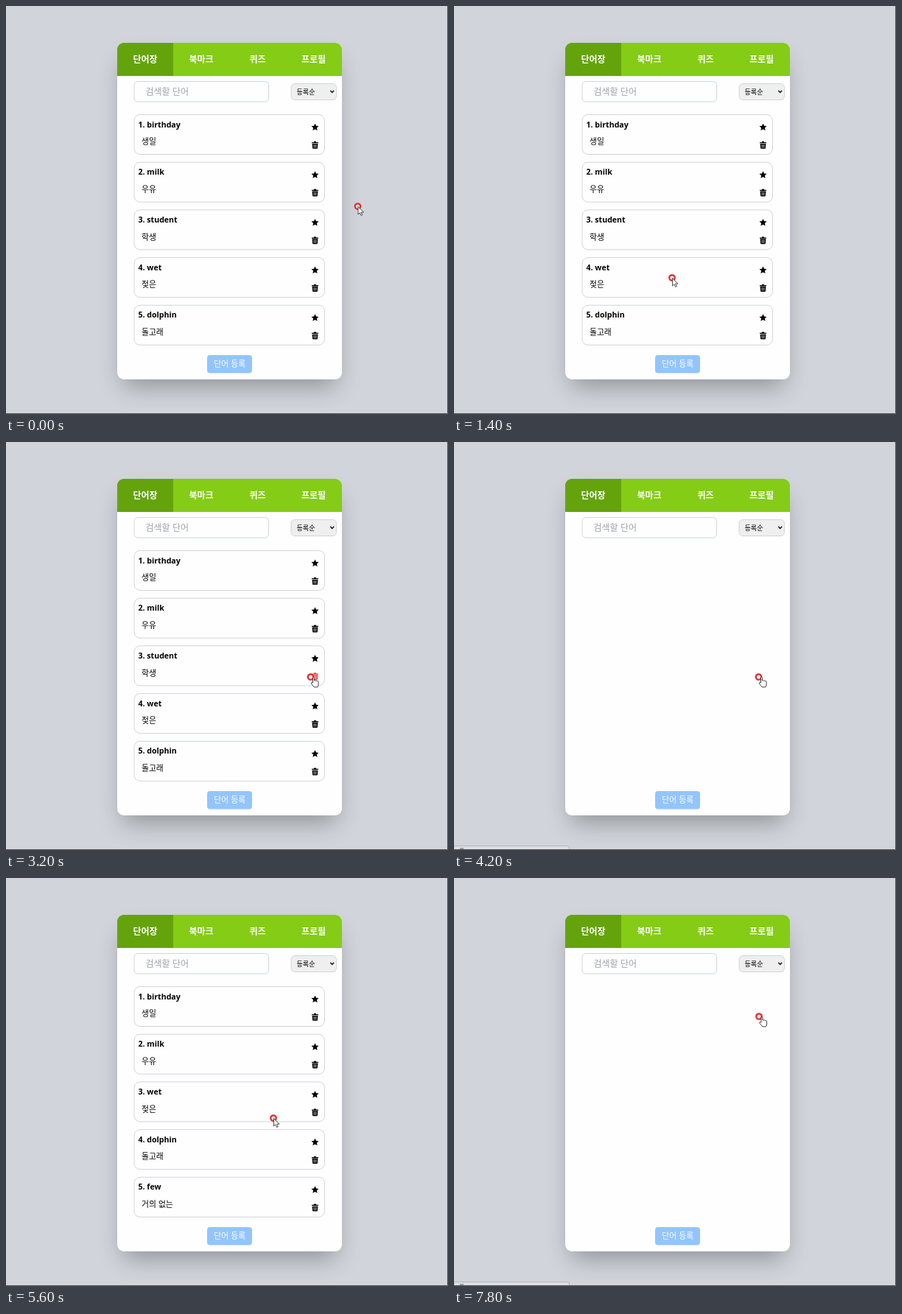
An HTML page for the animation above (8 s loop, 600x554 px).

```html
<!DOCTYPE html>
<html lang="ko">
<head>
<meta charset="utf-8">
<style>
  html, body { margin: 0; width: 100%; height: 100%; overflow: hidden; background: #d1d5db; }
  #stage { position: relative; width: 600px; height: 554px; overflow: hidden; }
  #card { position: absolute; left: 151px; top: 50px; width: 305px; height: 457px; border-radius: 9px;
    background: #fefefe; box-shadow: 0 17px 33px -8px rgba(0, 0, 0, .32); }
  svg { position: absolute; left: 0; top: 0; font: 10.8px 'Noto Sans CJK KR', 'Noto Sans CJK', sans-serif; }
  .tab { font-size: 12px; font-weight: 700; fill: #fff; text-anchor: middle; }
  .word { font: 700 10.6px 'Open Sans', 'Noto Sans', sans-serif; }
  .line { fill: none; stroke: #d1d5db; }
</style>
</head>
<body>
<div id="stage">
  <div id="card"></div>
  <svg width="600" height="554" viewBox="0 0 600 554">
    <defs>
      <clipPath id="view"><rect x="151" y="137" width="305" height="329"/></clipPath>
      <path id="star" d="M0-5 1.5-1.8 5-1.4 2.4 1 3.1 4.5 0 2.8-3.1 4.5-2.4 1-5-1.4-1.5-1.8Z"/>
      <g id="trash">
        <path d="M-4.5-3.8h2.6l.7-1.2h2.4l.7 1.2h2.6v1.3h-9ZM-3.9-1.9h7.8l-.5 6q-.1.9-1 .9h-4.8q-.9 0-1-.9Z"/>
        <path d="M-1.7-.7v4.4M0-.7v4.4M1.7-.7v4.4" stroke="#fff" stroke-width=".6"/>
      </g>
    </defs>
    <path d="M151 95V59a9 9 0 0 1 9-9H447a9 9 0 0 1 9 9V95Z" fill="#84cc16"/>
    <path d="M151 95V59a9 9 0 0 1 9-9H227V95Z" fill="#65a30d"/>
    <g class="tab">
      <text x="189" y="76.5">단어장</text>
      <text x="265" y="76.5">북마크</text>
      <text x="341.5" y="76.5">퀴즈</text>
      <text x="417.5" y="76.5">프로필</text>
    </g>
    <rect class="line" x="174" y="102.5" width="182.5" height="27.5" rx="5"/>
    <text x="189.5" y="121" font-size="12" fill="#9ca3af">검색할 단어</text>
    <rect x="387" y="105.5" width="61.5" height="22" rx="5" fill="#efefef" stroke="#d1d5db"/>
    <text x="394.5" y="119.7" font-size="9.1">등록순</text>
    <path d="M440.3 114.8l2.4 2.6 2.4-2.6" fill="none" stroke="#111" stroke-width="1.5"/>
    <g clip-path="url(#view)"><g id="list"></g></g>
    <rect x="273" y="474" width="61" height="24.5" rx="4" fill="#93c5fd"/>
    <text x="303.7" y="490.3" fill="#fff" text-anchor="middle">단어 등록</text>
    <g id="status">
      <path d="M0 548.5H154q2.5 0 2.5 2.5V554H0Z" fill="#dcdfe3" stroke="#b4b8be"/>
      <path d="M8 552h5" stroke="#555"/>
    </g>
    <path d="M599.5 0V553.5H0" fill="none" stroke="#4b4d50"/>
    <g id="pointer">
      <circle r="5.2" fill="#f3a5a5" opacity=".45"/>
      <circle id="ring" r="3.7" fill="#fff" fill-opacity=".6" stroke="#e03030" stroke-width="2.3"/>
      <path id="arrow" d="M.5.5V11l2.4-2.2 1.7 3.7 1.7-.8-1.7-3.6H8Z" fill="#fff" stroke="#222" stroke-width=".8"/>
      <path id="beam" d="M4 0.5q2 0 2 1.2 0-1.2 2-1.2M6 1.5v8M4 10.5q2 0 2-1.2 0 1.2 2 1.2" fill="none" stroke="#222" stroke-width=".9"/>
      <path id="hand" d="M3 8V1.2q1-1.4 2 0V5q1-.8 1.9.2 1-.6 1.8.4 1.8-.4 1.9 1.2V10q0 2-1.2 3.8H4.6Q3.4 11.8.9 9.2.2 7.7 1.6 7.5Z" fill="#fff" stroke="#222" stroke-width=".85"/>
    </g>
  </svg>
</div>
<script>
const LOOP = 8000, STEP = 100, PITCH = 64.7;
const $ = id => document.getElementById(id);
const words = [['birthday', '생일'], ['milk', '우유'], ['student', '학생'],
  ['wet', '젖은'], ['dolphin', '돌고래'], ['few', '거의 없는']];
const shorter = words.filter(w => w[0] !== 'student');

// Keys are [time, value, value...]
const cursorPath = [[0, 477.5, 272], [100, 470, 274], [500, 290, 305], [800, 279, 306], [1000, 280, 310],
  [1400, 296, 369], [1800, 300, 366], [2700, 413.5, 319], [4500, 413.5, 319], [4900, 191, 373],
  [5200, 210, 368], [5600, 363, 326], [6300, 414, 188]];
const scrollPath = [[0, 0], [400, 0], [700, 69], [1100, 69], [1400, 0],
  [5000, 0], [5200, 4.5], [5300, 4.5], [5500, 0]];

function at(keys, t) {
  const i = keys.findIndex(k => k[0] > t);
  if (i < 0) return keys[keys.length - 1].slice(1);
  const a = keys[i - 1], b = keys[i], p = (t - a[0]) / (b[0] - a[0]);
  const e = p * p * (3 - 2 * p);
  return a.slice(1).map((v, n) => v + (b[n + 1] - v) * e);
}

const within = (t, a, b) => t >= a && t < b;

function item([word, meaning], i, hot) {
  return `<g transform="translate(0 ${i * PITCH})">
    <rect class="line" x="174" y="147.5" width="258.5" height="54" rx="8"/>
    <text class="word" x="179.5" y="164.7">${i + 1}. ${word}</text>
    <text x="184" y="188.2">${meaning}</text>
    <use href="#star" x="419.5" y="164.5"/>
    <use href="#trash" x="419.5" y="188.8" fill="${i === hot ? '#ef4444' : '#000'}"/></g>`;
}

let shown;
function draw(now) {
  const t = Math.floor(now % LOOP / STEP) * STEP;
  const [x, y] = at(cursorPath, t), [scroll] = at(scrollPath, t);
  const empty = within(t, 4000, 4600) || t >= 7700;
  const hot = within(t, 2700, 4000) ? 2 : t >= 6300 ? 0 : -1;
  const html = empty ? '' : (t < 4000 ? words : shorter).map((w, i) => item(w, i, hot)).join('');
  if (html !== shown) $('list').innerHTML = shown = html;
  $('list').setAttribute('transform', `translate(0 ${-scroll})`);
  $('status').style.display = empty ? '' : 'none';

  const shape = hot >= 0 || empty ? 'hand' : within(t, 4800, 5300) && x < 215 ? 'beam' : 'arrow';
  for (const id of ['hand', 'beam', 'arrow']) $(id).style.display = id === shape ? '' : 'none';
  const click = within(t, 2800, 3200) ? (t - 2700) / 500 : within(t, 6400, 6700) ? (t - 6300) / 400 : 0;
  $('ring').setAttribute('r', 3.7 + 5 * Math.sin(Math.PI * click));
  $('pointer').setAttribute('transform', `translate(${x} ${y})`);
}

const start = performance.now();
function tick() {
  draw(performance.now() - start);
  requestAnimationFrame(tick);
}
tick();
</script>
</body>
</html>
```
